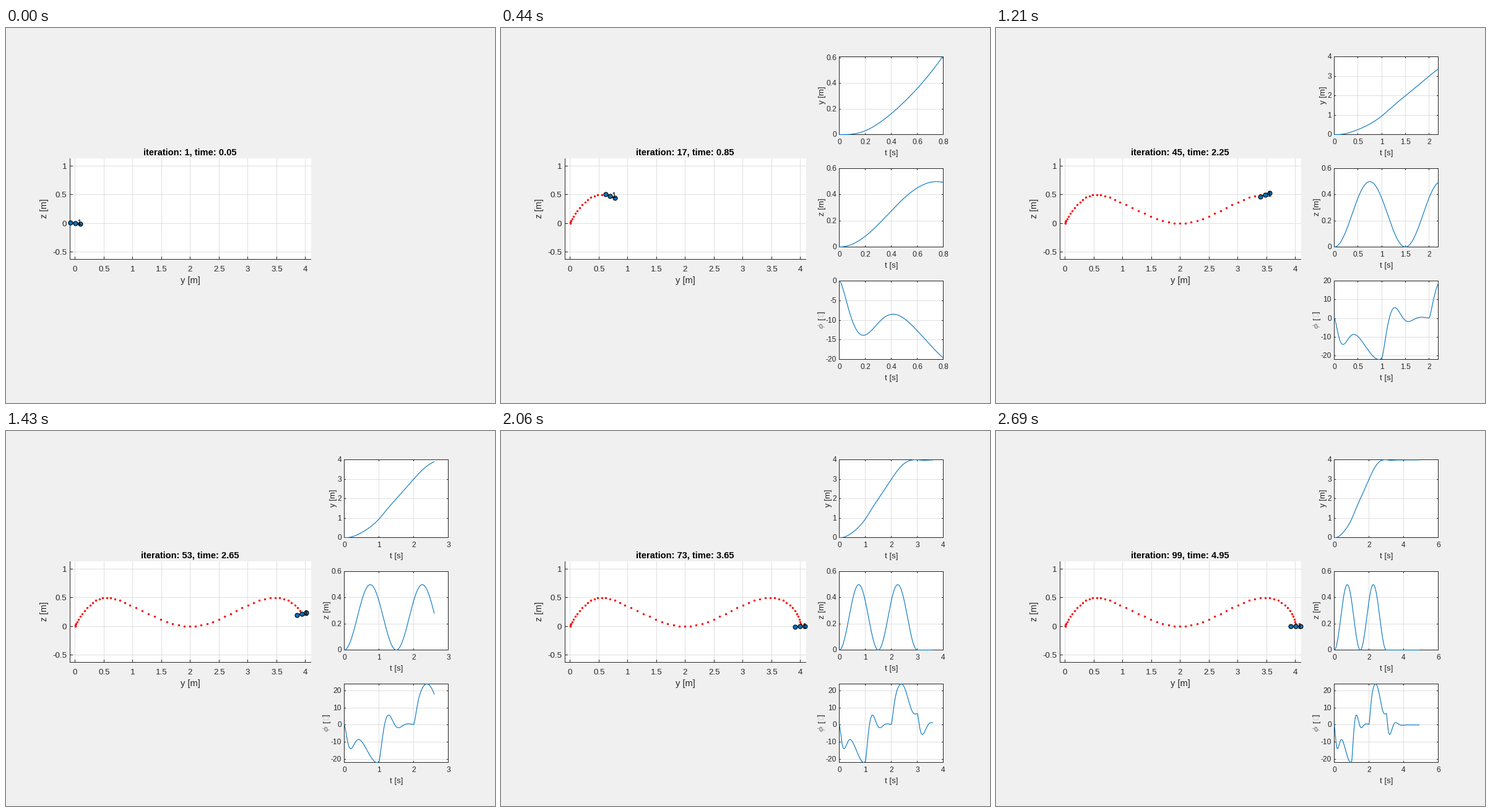
A matplotlib script that plays this animation: 790x607 px, repeating every 2790 ms.

```python
import numpy as np
import matplotlib.pyplot as plt
from matplotlib.animation import FuncAnimation
from matplotlib.patches import Rectangle

W, H = 790, 607
INK, GRID, BLUE = "#262626", "#dfdfdf", "#0072bd"
LOOP, TICK = 2790, 10  # ms

plt.rcParams["font.family"] = "Liberation Sans"
plt.rcParams["mathtext.fontset"] = "cm"

# The display skips four simulation steps at a time, twice only three
gaps = np.full(25, 4)
gaps[[19, 22]] = 3
iterations = 1 + np.append(0, np.cumsum(gaps))
starts = np.append(0, np.cumsum(np.where(gaps == 4, 110, 80)))

# Flight of a planar quadrotor
G = 9.81
DT = 0.001
KP_Y, KV_Y = 15, 9          # position loop
KP_ROLL, KV_ROLL = 600, 55  # roll loop
WAVE = 4 * np.pi / 3        # two humps of z in three seconds


def pos_z(t):
    return 0.25 * (1 - np.cos(WAVE * np.minimum(t, 3)))


def fly():
    """Track a path that speeds up, cruises and brakes for 1 s each."""
    times = np.arange(0, 5 + DT / 2, DT)
    ys, rolls = np.zeros_like(times), np.zeros_like(times)
    y = vy = roll = spin = plan_y = plan_v = 0.0
    for i, t in enumerate(times):
        ys[i], rolls[i] = y, roll
        t += DT / 2
        plan_a = (2, 0, -2, 0, 0, 0)[int(t)]
        climb = 0.25 * WAVE ** 2 * np.cos(WAVE * t) if t < 3 else 0

        want = plan_a + KV_Y * (plan_v - vy) + KP_Y * (plan_y - y)
        spin += DT * (KP_ROLL * (-want / G - roll) - KV_ROLL * spin)
        roll += DT * spin
        vy -= DT * (G + climb) * np.tan(roll)
        y += DT * vy
        plan_y += DT * (plan_v + plan_a * DT / 2)
        plan_v += DT * plan_a
    return times, ys, np.degrees(rolls)


TIMES, YS, ROLLS = fly()


def pos_y(t):
    return np.interp(t, TIMES, YS)


def roll_deg(t):
    return np.interp(t, TIMES, ROLLS)


# Axis limits and ticks
def nice_step(lo, hi, outer):
    """Smallest 1-2-5 step that needs at most four intervals."""
    for e in range(-5, 4):
        for m in (1, 2, 5):
            s = m * 10.0 ** e
            if outer:
                n = np.ceil(hi / s - 1e-9) - np.floor(lo / s + 1e-9)
            else:
                n = np.floor(hi / s + 1e-9) - np.ceil(lo / s - 1e-9)
            if n <= 4:
                return s


def limits(v):
    """Round the range outwards unless that wastes too much room."""
    lo, hi = float(np.min(v)), float(np.max(v))
    s = nice_step(lo, hi, True)
    a = np.floor(lo / s + 1e-9) * s
    b = np.ceil(hi / s - 1e-9) * s
    room = 0.2 * (b - a)
    return (a if lo - a <= room else lo), (b if b - hi <= room else hi)


def ticks(lo, hi):
    s = nice_step(lo, hi, False)
    n = np.arange(np.ceil(lo / s - 1e-9), np.floor(hi / s + 1e-9) + 1)
    return n * s


def label(v):
    return f"{round(float(v), 6) + 0.0:g}"


def width(s, size):
    """Advance width of a number."""
    return size * sum({".": .278, "-": .333}.get(c, .556) for c in s)


def mid(p):
    """Centre of the pixel under p."""
    return np.floor(p + 1e-6) + 0.5


# Drawing in pixels, y pointing down
fig = plt.figure(figsize=(W / 72, H / 72), dpi=72, facecolor="#f0f0f0")
ax = fig.add_axes([0, 0, 1, 1])
ax.set_xlim(0, W)
ax.set_ylim(H, 0)
ax.axis("off")


def text(x, y, s, size, ha="center", color=INK, **kw):
    return ax.text(x, y, s, fontsize=size, ha=ha, va="baseline", color=color, **kw)


def upright(x, y, s, size):
    return text(x, y, s, size, rotation=90, rotation_mode="anchor")


def strokes(segments, color):
    """Many separate one-pixel lines as one artist."""
    xs, ys = [], []
    for x0, y0, x1, y1 in segments:
        xs += [x0, x1, np.nan]
        ys += [y0, y1, np.nan]
    return ax.plot(xs, ys, color=color, lw=1, solid_capstyle="butt",
                   snap=False)[0]


def box(x0, y0, x1, y1, **kw):
    return ax.add_patch(Rectangle((x0, y0), x1 - x0, y1 - y0, snap=False, **kw))


# Flight view
def view_x(y):
    return 111.9 + 93 * y


def view_z(z):
    return 316.4 - 93 * z


def draw_view():
    box(103, 211, 493, 375, fc="white", lw=0)
    xs, zs = np.arange(0, 4.1, 0.5), np.arange(-0.5, 1.1, 0.5)
    cols, rows = mid(view_x(xs)), mid(view_z(zs))
    strokes([(c, 211, c, 374) for c in cols]
            + [(104, r, 493, r) for r in rows], GRID)
    strokes([(103.5, 211, 103.5, 375), (103, 374.5, 493, 374.5)]
            + [(c, 370, c, 374) for c in cols]
            + [(104, r, 108, r) for r in rows], INK)
    for v, c in zip(xs, cols):
        text(c, 393.5, label(v), 13.33)
    for v, r in zip(zs, rows):
        text(98, r + 4.5, label(v), 13.33, ha="right")
    text(298, 413, "y [m]", 14.67)
    upright(66, 292, "z [m]", 14.67)


draw_view()
title = text(297.5, 205, "", 14.67, color="black", weight="bold")
trail, = ax.plot([], [], "o", color="red", ms=3.4, mew=0)
body, = ax.plot([], [], "-o", color="black", lw=1.5, ms=7,
                mfc=BLUE, mec="black", mew=1.1)
number = text(0, 0, "1", 13.33, color="black")

# Graphs on the right
LEFT, RIGHT = 546.5, 714.5
PANELS = [(46.5, 172.5, "y", pos_y), (227.5, 354.5, "z", pos_z),
          (409.5, 536.5, "phi", roll_deg)]
parts = []


def draw_panel(top, bottom, name, func, t):
    v = func(t)
    (t0, t1), (v0, v1) = limits(t), limits(v)

    def sx(a):
        return LEFT + (a - t0) / (t1 - t0) * (RIGHT - LEFT)

    def sy(a):
        return bottom - (a - v0) / (v1 - v0) * (bottom - top)

    tx, tv = ticks(t0, t1), ticks(v0, v1)
    cols, rows = mid(sx(tx)), mid(sy(tv))
    parts.append(box(LEFT, top, RIGHT, bottom, fc="white", lw=0))
    parts.append(strokes([(c, top, c, bottom) for c in cols]
                         + [(LEFT, r, RIGHT, r) for r in rows], GRID))
    frame = [(LEFT - .5, y, RIGHT + .5, y) for y in (top, bottom)]
    frame += [(x, top, x, bottom) for x in (LEFT, RIGHT)]
    for c in cols:
        frame += [(c, bottom - 2.5, c, bottom), (c, top, c, top + 2.5)]
    for r in rows:
        frame += [(LEFT, r, LEFT + 2.5, r), (RIGHT - 2.5, r, RIGHT, r)]
    parts.append(strokes(frame, INK))
    parts.extend(ax.plot(sx(t), sy(v), color=BLUE, lw=1.1, snap=False))

    for a, c in zip(tx, cols):
        parts.append(text(c, bottom + 15.5, label(a), 12))
    names = [label(a) for a in tv]
    for s, r in zip(names, rows):
        parts.append(text(542, r + 3.5, s, 12, ha="right"))
    parts.append(text(630.5, bottom + 33.5, "t [s]", 13.2))

    base = 538.5 - max(width(s, 12) for s in names)
    centre = (top + bottom) / 2 - 1
    if name != "phi":
        parts.append(upright(base, centre, f"{name} [m]", 13.2))
        return
    for s, dy in ((r"$\phi$", 10), ("[", -2), ("]", -12)):
        parts.append(upright(base, centre + dy, s, 13.2))
    parts.append(box(base - 8.5, centre - 9.5, base - .5, centre - 4.5,
                     fill=False, ec="#cccccc", lw=0.8))


def update(n):
    step = np.searchsorted(starts, n * TICK, "right") - 1
    k = int(iterations[step])
    now = 0.05 * k
    title.set_text(f"iteration: {k}, time: {now:.2f}")

    past = 0.05 * np.arange(k)
    trail.set_data(view_x(pos_y(past)), view_z(pos_z(past)))

    cx, cz = view_x(pos_y(now)), view_z(pos_z(now))
    tilt = np.radians(roll_deg(now))
    arm = 8 * np.array([-1, 0, 1])
    body.set_data(cx + arm * np.cos(tilt), cz - arm * np.sin(tilt))
    number.set_position((cx + 7, cz + 3.5))

    while parts:
        parts.pop().remove()
    if k > 1:
        t = 0.005 * np.arange(10 * (k - 1))
        for panel in PANELS:
            draw_panel(*panel, t)
    return []


anim = FuncAnimation(fig, update, frames=LOOP // TICK, interval=TICK,
                     init_func=lambda: update(0), repeat=True,
                     repeat_delay=0, cache_frame_data=False)
plt.show()
```
